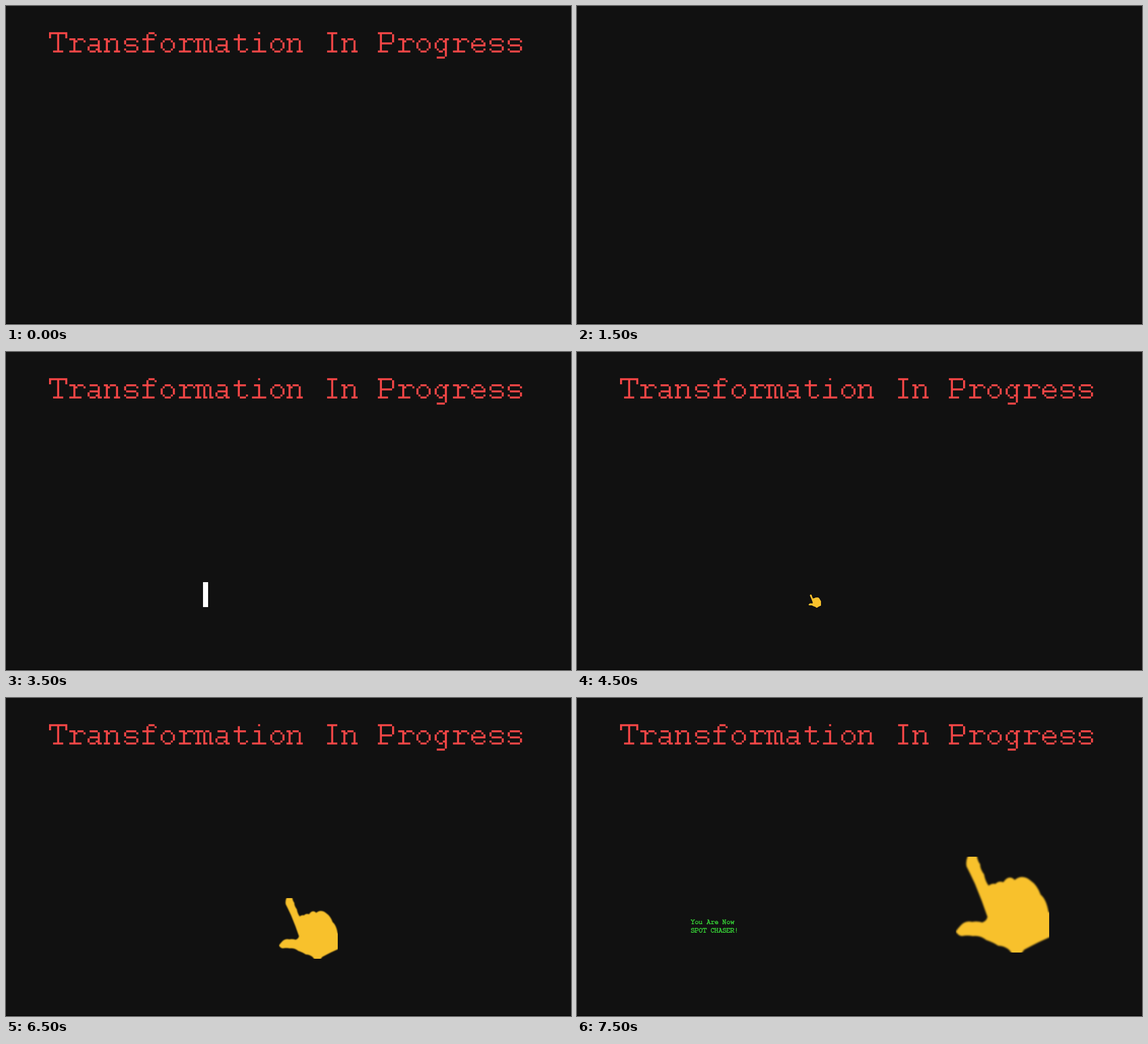
Write an HTML page that moves like this. It is 998 by 561 pixels and loops after 8000 ms.

```html
<!DOCTYPE html>
<html lang="en">
<head>
<meta charset="utf-8">
<title>Transformation In Progress</title>
<style>
  html, body { margin: 0; width: 100%; height: 100%; overflow: hidden; background: #111; }
  svg { display: block; width: 998px; height: 561px; }

  .pixels path { fill: none; stroke-linecap: square; }
  #heading { stroke: #f44646; stroke-width: 1; }
  #message { stroke: #38dc38; stroke-width: 1.5; }

  /* The picture moves in hard half-second steps: 6.25% each. */
  #heading, #message, #bar, #hand { animation: 8s step-end infinite; }
  #heading { animation-name: blink; }
  #message { animation-name: reveal; }
  #bar { animation-name: shrink; }
  #hand { animation-name: approach; }

  @keyframes blink {
    0%, 12.5%, 25% { opacity: 1; }
    6.25%, 18.75% { opacity: 0; }
    100% { opacity: 1; }
  }
  @keyframes reveal {
    0% { opacity: 0; }
    93.75%, 100% { opacity: 1; }
  }
  @keyframes shrink {
    0% { opacity: 0; }
    25% { opacity: 1; transform: translate(188px, 351px) scale(18, 99); }
    31.25% { opacity: 1; transform: translate(246.5px, 378px) scale(13.5, 72); }
    37.5% { opacity: 1; transform: translate(310px, 396px) scale(9, 54); }
    43.75% { opacity: 1; transform: translate(348px, 406px) scale(9, 44); }
    50% { opacity: 1; transform: translate(392px, 427px) scale(4, 23); }
    56.25%, 100% { opacity: 0; }
  }
  @keyframes approach {
    0% { opacity: 0; }
    56.25% { opacity: 1; transform: translate(409px, 428px) scale(.135); }
    62.5% { opacity: 1; transform: translate(431px, 412px) scale(.232); }
    68.75% { opacity: 1; transform: translate(470px, 389.5px) scale(.356); }
    75% { opacity: 1; transform: translate(476px, 380px) scale(.476); }
    81.25% { opacity: 1; transform: translate(482px, 353px) scale(.633); }
    87.5% { opacity: 1; transform: translate(567px, 323px) scale(.811); }
    93.75%, 100% { opacity: 1; transform: translate(669px, 280px); }
  }
</style>
</head>
<body>
<svg viewBox="0 0 998 561">
  <defs>
    <clipPath id="crop"><rect width="165" height="169"/></clipPath>
    <filter id="soft" color-interpolation-filters="sRGB">
      <feGaussianBlur stdDeviation="1.5"/>
    </filter>
  </defs>
  <rect width="998" height="561" fill="#111"/>
  <rect y="560" width="998" height="1" fill="#000"/>

  <g id="heading" class="pixels" role="img" aria-label="Transformation In Progress"></g>
  <g id="message" class="pixels" role="img" aria-label="You Are Now SPOT CHASER!"></g>

  <rect id="bar" width="1" height="1" fill="#fff"/>
  <g id="hand">
    <g clip-path="url(#crop)">
      <path filter="url(#soft)" fill="#f8c12c" d="M23 -4
        Q17 6 19 17 L25 29 L34 48 L46 78 L56 106 Q55 113 47 116
        Q38 113 29 115 Q17 112 9 121 Q4 126 0 132 Q4 139 11 140
        Q20 138 30 140 Q43 138 54 147 Q66 151 75 157 Q86 157 95 165
        L101 173 H114 L121 164 Q134 157 146 151 L170 140 V98 H164
        Q160 75 150 67 Q144 50 132 42 Q118 30 104 41
        Q94 31 84 45 Q76 42 70 48 Q64 46 58 51
        Q52 43 50 31 Q43 22 43 13 Q38 7 37 -4 Z"/>
    </g>
  </g>
</svg>
<script>
  // Slab letters as strokes on a grid nine cells wide, baseline at row 9.
  const columns = 9;
  const glyphs = {
    T: "M0 2V0H8V2M4 0V9M2 9H6",
    r: "M1 3H3V9M1 9H6M4 4h0M5 3H7M8 4h0",
    a: "M2 3H5M6 4V9H7M2 6H6M1 7V8M2 9H4M5 8h0",
    n: "M0 3H1V9M2 4h0M3 3H5M6 4V9M0 9H2M5 9H7",
    s: "M2 3H6M7 4h0M1 4V5M2 6H6M7 7V8M1 8h0M2 9H6",
    f: "M4 0H6M7 1h0M3 1V9M1 3H6M1 9H6",
    o: "M3 3H5M2 4h0M6 4h0M1 5V7M7 5V7M2 8h0M6 8h0M3 9H5",
    m: "M0 3H1V9M2 3H3M4 4V9M5 3H6M7 4V9H8M0 9H2M4 9H5",
    t: "M3 1V8M1 3H6M4 9H6M7 8h0",
    i: "M4 0h0M2 3H4V9M1 9H7",
    I: "M2 0H6M4 0V9M2 9H6",
    P: "M0 0H6M7 1V4M6 5H1M1 0V9M0 9H4",
    g: "M3 3H4M2 4h0M5 4h0M7 3H6V11M1 5V7M2 8h0M5 8h0M3 9H4M5 12H2",
    e: "M3 3H5M2 4h0M6 4h0M1 5V7M7 5V6M1 6H7M2 8h0M3 9H6M7 8h0",
    Y: "M0 0H2M6 0H8M1 0L4 4L7 0M4 4V9M2 9H6",
    u: "M0 3H1V8M2 9H4M5 8h0M5 3H6V9H7",
    A: "M2 0H4L7 9M4 0L1 9M2 6H6M0 9H2M6 9H8",
    N: "M0 0H1V9M0 9H2M1 0L6 9V0M5 0H7",
    w: "M0 3H2M6 3H8M1 3L2 9L4 5L6 9L7 3",
    S: "M6 2V0M6 1L5 0H3L1 1V3L2 4H5L7 5V8L5 9H3L1 8M1 7V9",
    O: "M3 0H5L7 2V7L5 9H3L1 7V2Z",
    C: "M7 0V2L5 0H3L1 2V7L3 9H5L7 7",
    H: "M0 0H2M5 0H7M1 0V9M6 0V9M1 4H6M0 9H2M5 9H7",
    E: "M0 0H7V2M1 0V9M0 9H7V7M1 4H4",
    R: "M0 0H5L7 1V3L5 5H1M1 0V9M0 9H3M4 5L7 9H8",
    "!": "M4 0V6M4 9h0"
  };

  function write(id, text, x, y, advance) {
    const group = document.getElementById(id);
    const cell = advance / columns;
    [...text].forEach((char, i) => {
      if (!glyphs[char]) return;
      const path = document.createElementNS("http://www.w3.org/2000/svg", "path");
      path.setAttribute("d", glyphs[char]);
      path.setAttribute("transform",
        `translate(${x + i * advance} ${y}) scale(${cell}) translate(.5 .5)`);
      group.append(path);
    });
  }

  write("heading", "Transformation In Progress", 76, 46.2, 32.27);
  write("message", "You Are Now", 201, 391, 7);
  write("message", "SPOT CHASER!", 201, 406, 7);
</script>
</body>
</html>
```
